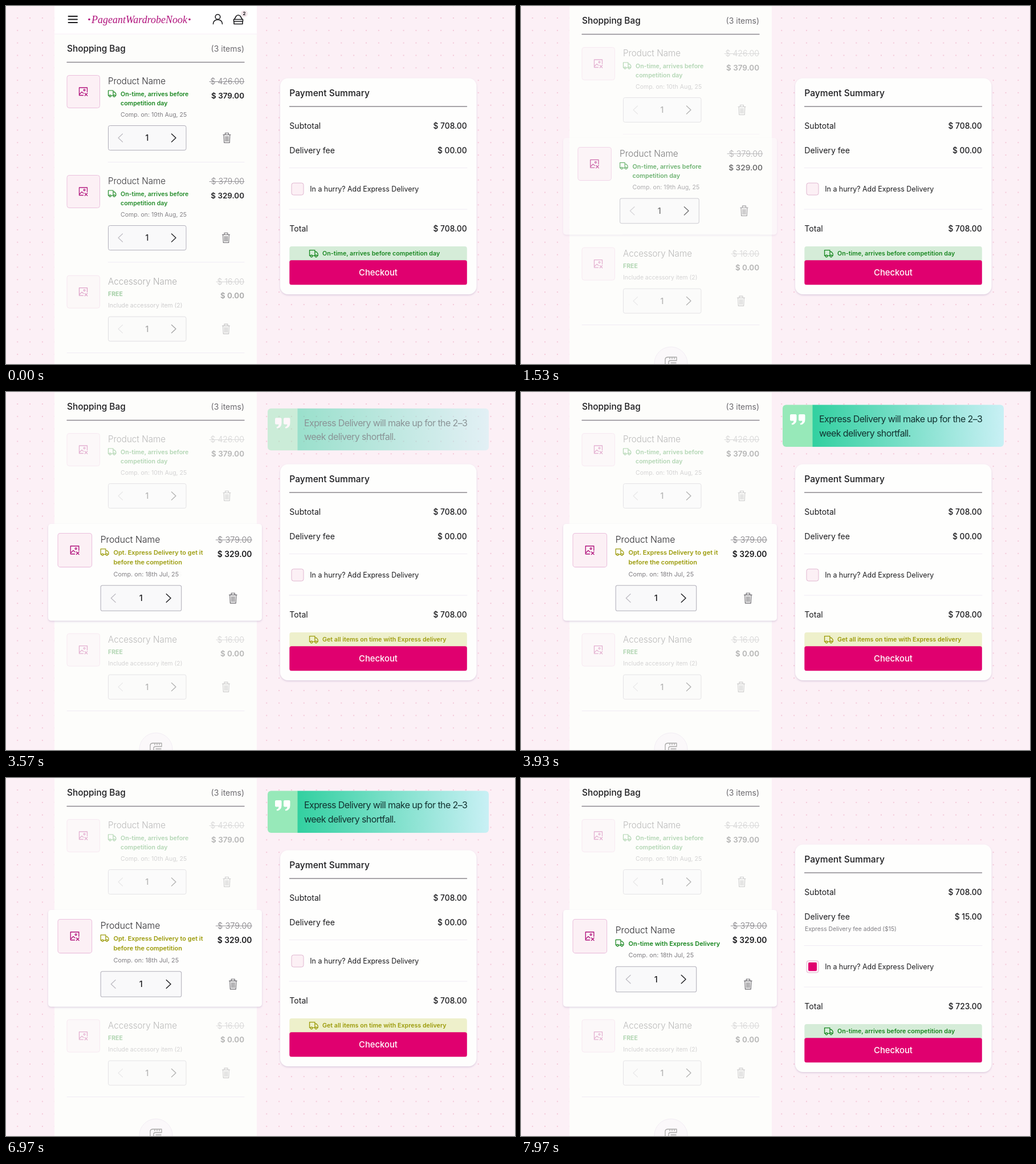
Animation, 893 px wide and 627 px high, one loop 8000 ms. Source, as an HTML page:

```html
<!DOCTYPE html>
<html lang="en">
<head>
<meta charset="utf-8">
<title>Shopping bag</title>
<style>
  html, body { margin: 0; width: 100%; height: 100%; overflow: hidden; background: #fcf0f6; }
  svg { display: block; width: 100%; height: 100%; }
  text { font-family: Inter, "Open Sans", sans-serif; white-space: pre; }
  .brand { font-family: "Liberation Serif", "Noto Serif", serif; font-style: italic; }
  .line { fill: none; stroke-linecap: round; stroke-linejoin: round; }
</style>
</head>
<body>
<svg id="stage" viewBox="0 0 893 627"></svg>
<script>
const LOOP = 8000;
const PINK = '#e0006f', PALE = '#fcf0f5', GREEN = '#17861f', OLIVE = '#9b9a08';
const INK = '#1c1c1f', GREY = '#7f7d82', RULE = '#f0ebf4';

// ---- drawing helpers ----
const text = (x, y, s, size, { w = 400, fill = INK, a = 'start', extra = '' } = {}) =>
  `<text x="${x}" y="${y}" font-size="${size}" font-weight="${w}" fill="${fill}" text-anchor="${a}" ${extra}>${s}</text>`;
const rect = (x, y, w, h, r, fill, stroke = 'none', extra = '') =>
  `<rect x="${x}" y="${y}" width="${w}" height="${h}" rx="${r}" fill="${fill}" stroke="${stroke}" ${extra}/>`;
const path = (d, stroke, w = 1.2) =>
  `<path class="line" d="${d}" stroke="${stroke}" stroke-width="${w}"/>`;
const hline = (x1, x2, y, stroke, w = 1) => path(`M${x1} ${y}H${x2}`, stroke, w);
const at = (x, y, body, scale = 1) =>
  `<g transform="translate(${x} ${y}) scale(${scale})">${body}</g>`;
const group = (id, body) => `<g id="${id}">${body}</g>`;

// ---- icons ----
const truck = c => path('M2 9.5H.5V.5H9V9.5H5.2M9 3.2H11.6L13.8 6.2V9.5H12.4M9 9.5H9.4', c, 1.2) +
  `<g class="line" stroke="${c}" stroke-width="1.2"><circle cx="3.6" cy="10" r="1.6"/><circle cx="10.9" cy="10" r="1.6"/></g>`;
const picture = path('M7.5 14H.5V.5H14.5V8M1 12L5 8L8 10.5M10.3 10.3L14.7 14.7M14.7 10.3L10.3 14.7', '#b0127c', 1.3) +
  '<circle class="line" cx="9.5" cy="4.8" r="1.4" stroke="#b0127c" stroke-width="1.2"/>';
const trash = path('M-6.5 -5.5H6.5M-3 -5.8V-8.5H3V-5.8M-5.3 -5.3L-4.7 8.5H4.7L5.3 -5.3M-2.3 -2.8V6M0 -2.8V6M2.3 -2.8V6', '#66646a', 1.1);
const quoteMark = x => `<path fill="#fff" d="M${x + 2} 39h7.5q2 0 2 2v7q0 8-8 9.6l-1-2.3q4-1.2 4-4.8h-4.5q-2 0-2-2v-7.5q0-2 2-2z"/>`;

const stepper = y => rect(72.5, y, 136.5, 43, 3, '#f9f9fa', '#b0aeb9') +
  path(`M97.5 ${y + 14.5}l-7.5 7l7.5 7`, '#bdbbc2', 1.2) +
  text(140.5, y + 26.5, '1', 14, { w: 500, a: 'middle' }) +
  path(`M183.5 ${y + 14.5}l7.5 7l-7.5 7`, INK, 1.4);

const note = (color, lines) => at(72, 26, truck(color)) +
  lines.map((s, i) => text(94, 36.5 + i * 16.3, s, 10.6, { w: 600, fill: color })).join('');
const ON_TIME = ['On-time, arrives before', 'competition day'];
const thumb = rect(0, 0, 57.5, 57, 4, PALE, '#ebbfdd') + at(21, 21, picture);
const comp = s => text(94, 72.5, s, 10.5, { fill: GREY });
const name = s => text(72, 15.8, s, 15.2, { w: 300, fill: '#2c2b2f' });

// prices and bin, measured from the right edge of a row
const side = (old, now, binX, binY) =>
  text(0, 15.8, old, 14.1, { w: 300, fill: '#7d7b80', a: 'end' }) + hline(old.length < 8 ? -49 : -61, 0, 11, '#8f8d92') +
  text(0, 40.3, now, 13.4, { w: 600, a: 'end' }) + at(binX, binY, trash);

const row = (id, left, right) => group(id, group(id + 'L', left) + group(id + 'R', right));

// ---- scene ----
const header = rect(85, -10, 355, 59, 0, '#fff') + hline(85, 440, 49, '#f8eef7') +
  path('M109.5 18H125M109.5 23.5H125M109.5 29H125', INK, 1.9) +
  '<circle cx="146" cy="23.5" r="1.8" fill="#b0127c"/><circle cx="322" cy="23.5" r="1.8" fill="#b0127c"/>' +
  text(234, 29.5, 'PageantWardrobeNook', 18, { fill: '#b0127c', a: 'middle', extra: 'class="brand"' }) +
  path('M363.5 31.5Q364 24 371.5 24T379.5 31.5', INK, 1.6) +
  '<circle class="line" cx="371.5" cy="19" r="4.3" stroke="#1c1c1f" stroke-width="1.6"/>' +
  path('M400.5 23.5L404 17.5Q407.5 14.5 411 17.5L414.5 23.5M399.5 23.5H415.5V27H399.5ZM400 27V31.5H415V27', INK, 1.6) +
  '<circle cx="418" cy="13.5" r="6" fill="#f3e6ea"/>' + text(418, 16.3, '2', 8, { w: 700, a: 'middle' });

const bagTitle = text(107, 80.3, 'Shopping Bag', 15.4, { w: 500 }) +
  text(418, 80, '(3 items)', 14, { fill: '#6d6b70', a: 'end' }) + hline(107, 418, 98.5, '#8b878f', 1.4);

const tape = '<g opacity=".45"><circle cx="263" cy="675" r="29" fill="#faf3fa" stroke="#e4d8ea"/>' +
  path('M253 676V668Q253 664 258 664H273V670H262Q259 670 259 673V676M261 664V667M265 664V667M269 664V667M263 674H272', '#444', 1.3) + '</g>';

const pays = (y, label, id, value) => text(497.3, y, label, 14.1) +
  text(808.7, y, value, 13.8, { w: 500, a: 'end', extra: id ? `id="${id}"` : '' });
const banner = (id, color, fill, s) => group(id,
  rect(497.3, 421, 311.5, 30, 4, fill) + at(532, 427, truck(color), 1.1) +
  text(555, 437.2, s, 10.7, { w: 600, fill: color }));

document.getElementById('stage').innerHTML = `
<defs>
  <pattern id="dots" x="9.3" y="10.1" width="21.85" height="21.82" patternUnits="userSpaceOnUse">
    <circle cx="10.9" cy="10.9" r="1.1" fill="#f3bfd2"/>
  </pattern>
  <linearGradient id="mint"><stop stop-color="#32d0a0"/><stop offset="1" stop-color="#c9f0f5"/></linearGradient>
  <filter id="soft" x="-5%" y="-5%" width="110%" height="112%">
    <feDropShadow dx="0" dy="1.5" stdDeviation="1.6" flood-color="#a78fb8" flood-opacity=".4"/>
  </filter>
  <clipPath id="round"><rect x="459" y="22.5" width="388" height="73.5" rx="6"/></clipPath>
</defs>
${rect(0, 0, 893, 627, 0, '#fcf0f6')}${rect(0, 0, 893, 627, 0, 'url(#dots)')}
${rect(85, 0, 355, 627, 0, '#fdfdfb')}
${group('page', header + bagTitle +
  row('one', thumb + name('Product Name') + note(GREEN, ON_TIME) + comp('Comp. on: 10th Aug, 25') + stepper(88),
    side('$ 426.00', '$ 379.00', -30.5, 109.5)) +
  group('rules', hline(179, 418, 273.5, RULE) + hline(179, 418, 448.8, RULE)) + hline(107, 418, 607.5, RULE) +
  row('three', thumb + name('Accessory Name') + text(72, 36.3, 'FREE', 10.5, { w: 700, fill: GREEN }) +
    text(72, 56.3, 'Include accessory item (2)', 10.4, { fill: GREY }) + stepper(72),
    side('$ 16.00', '$ 0.00', -32, 93.5)) + tape +
  rect(74, 280, 375, 169.5, 5, '#fefefd', 'none', 'id="focus" filter="url(#soft)"') +
  row('two', thumb +
    group('head', name('Product Name') + group('noteA', note(GREEN, ON_TIME)) +
      group('noteB', note(OLIVE, ['Opt. Express Delivery to get it', 'before the competition'])) +
      group('noteC', note(GREEN, ['On-time with Express Delivery']))) +
    group('foot', group('dateA', comp('Comp. on: 19th Aug, 25')) + group('dateB', comp('Comp. on: 18th Jul, 25')) + stepper(88)),
    side('$ 379.00', '$ 329.00', -32, 109.5)))}
${rect(481, 126.5, 344.5, 378.5, 14, '#fefefd', 'none', 'id="card" filter="url(#soft)"')}
${group('upper', text(497.3, 157.5, 'Payment Summary', 15.6, { w: 500 }) + hline(497.5, 808.5, 176, '#8b878f', 1.3) +
  pays(214.5, 'Subtotal', '', '$ 708.00') + pays(257.5, 'Delivery fee', 'fee', '$ 00.00') +
  text(498, 278.3, 'Express Delivery fee added ($15)', 10.3, { fill: GREY, extra: 'id="feeNote"' }))}
${group('lower', hline(497, 809, 283.5, RULE) +
  rect(501, 310, 21, 21, 3.5, PALE, '#e0b6d0') + rect(504, 313, 15, 15, 2, PINK, 'none', 'id="tick"') +
  text(533.3, 325.2, 'In a hurry? Add Express Delivery', 12.4) + hline(497, 809, 356, RULE) +
  pays(394.5, 'Total', 'total', '$ 708.00') +
  banner('stripA', GREEN, '#d5ecd8', 'On-time, arrives before competition day') +
  banner('stripB', OLIVE, '#eef0cb', 'Get all items on time with Express delivery') +
  rect(497.3, 445.2, 311.5, 43, 3.5, PINK) + text(653, 472.3, 'Checkout', 14.8, { w: 500, fill: '#fff', a: 'middle' }))}
${group('quote', `<g clip-path="url(#round)">${rect(459, 22, 53, 75, 0, '#97e9b9')}${rect(511.5, 22, 336, 75, 0, 'url(#mint)')}</g>` +
  quoteMark(472) + quoteMark(487) +
  ['Express Delivery will make up for the 2–3', 'week delivery shortfall.'].map((s, i) =>
    text(523, 53.3 + i * 24.5, s, 16, { fill: '#123230', extra: 'letter-spacing="-.6"' })).join(''))}`;

// ---- motion ----
const el = {};
document.querySelectorAll('#stage [id]').forEach(n => el[n.id] = n);
const mix = (a, b, p) => a + (b - a) * p;
const ease = (t, from, to) => {
  const p = Math.min(1, Math.max(0, (t - from) / (to - from)));
  return p * p * (3 - 2 * p);
};
const move = (id, x, y, s = 1) => el[id].setAttribute('transform', `translate(${x} ${y}) scale(${s})`);
const fade = (id, o) => el[id].setAttribute('opacity', o);
const say = (id, s) => { if (el[id].textContent !== s) el[id].textContent = s; };

const DIM = 0.32;
move('oneL', 107, 121.5); move('oneR', 418, 121.5);
move('threeL', 107, 472.1); move('threeR', 418, 472.1);

function draw(t) {
  const focus = ease(t, 1300, 1800);
  const late = ease(t, 3350, 3600);
  const express = ease(t, 7300, 7700);

  move('page', 0, -49 * ease(t, 167, 1167));
  fade('one', mix(1, DIM, ease(t, 100, 1300)));
  fade('three', mix(0.38, DIM, ease(t, 0, 500)));
  fade('two', mix(mix(1, DIM, ease(t, -180, 950)), 1, focus));
  fade('focus', focus);
  fade('rules', 1 - focus);

  const scale = mix(1, 1.037, focus);
  move('twoL', mix(107, 91, focus), 296.5, scale);
  move('twoR', mix(418, 431.5, focus), 296.5, scale);
  move('head', 0, 8 * express);
  move('foot', 0, -8.2 * express);

  fade('noteA', 1 - late);
  fade('dateA', 1 - late);
  fade('dateB', late);
  fade('noteB', late * (1 - express));
  fade('noteC', express);
  fade('stripA', Math.max(1 - late, express));
  fade('stripB', late * (1 - express));

  const shown = ease(t, 3400, 3750) * (1 - ease(t, 7300, 7600));
  fade('quote', shown);
  move('quote', 0, 12 * (1 - shown));

  el.card.setAttribute('y', 126.5 - 10 * express);
  el.card.setAttribute('height', 378.5 + 20 * express);
  move('upper', 0, -10 * express);
  move('lower', 0, 10 * express);
  fade('feeNote', express);
  fade('tick', ease(t, 7250, 7400));
  say('fee', t < 7400 ? '$ 00.00' : '$ 15.00');
  say('total', t < 7400 ? '$ 708.00' : '$ 723.00');
}

const start = performance.now();
function tick() {
  draw((performance.now() - start) % LOOP);
  requestAnimationFrame(tick);
}
tick();
</script>
</body>
</html>
```
